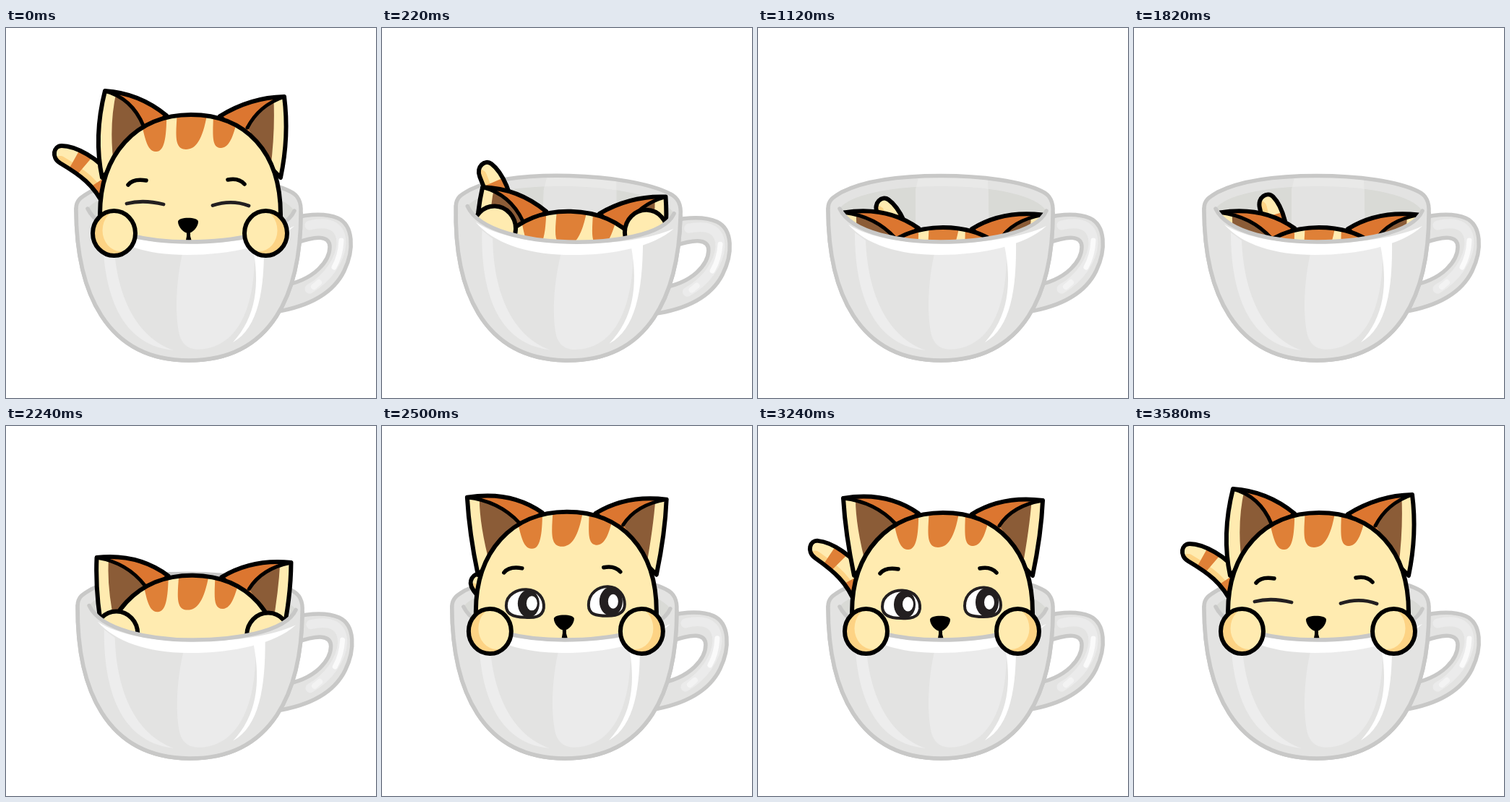
These frames come from a looping animation (512 by 512 pixels, 3.6 s). An HTML page with a canvas:

```html
<!DOCTYPE html>
<html lang="en">
<head>
<meta charset="utf-8">
<title>Cat in a cup</title>
<style>
html, body { margin: 0; width: 100%; height: 100%; overflow: hidden; background: #fff; }
canvas { display: block; width: 512px; height: 512px; }
</style>
</head>
<body>
<canvas id="stage" width="512" height="512"></canvas>
<script>
const ctx = document.getElementById('stage').getContext('2d');
const LOOP = 3600;
const CREAM = '#ffebb0', SHADE = '#fdd384', ORANGE = '#df8037', BROWN = '#8b5c37';
const LINE = '#c8c8c7', CUP = '#e3e3e2', INSIDE = '#d9dad6', PANEL = '#ebebeb';

const RIM = 'C130 285 200 296 253 296 C310 296 385 285 399 253';
const BACK = 'C97 238 104 234 116 227 C150 210 200 204.5 253 204.5 C310 204.5 365 212 393 226 C404 231 409 240 408 256';
const BODY = 'C408 364 370 460 253 460 C138 460 97 364 97 250';
const path = d => new Path2D(d);

const cup = {
  outer: path(`M97 250 ${BACK} ${BODY} Z`),
  body: path(`M408 256 ${BODY}`),
  front: path(`M113 250 ${RIM} L408 256 ${BODY} Z`),
  inside: path(`M113 250 ${RIM} C385 232 330 219 253 219 C180 219 125 232 113 250 Z`),
  rim: path(`M113 250 ${RIM}`),
  backLight: path('M222 206 L318 206 L320 296 L218 296 L218 225 Z'),
  above: path(`M0 0 H512 V253 H399 C385 285 310 296 253 296 C200 296 130 285 113 250 H0 Z`),
  gloss: path('M125 272 C155 291 205 298 253 298 C310 298 365 290 399 274 C370 301 310 314 250 314 C195 314 150 300 125 272 Z'),
  leftLight: path('M134 283 C134 350 150 438 232 446 C180 428 152 370 149 294 Z'),
  panel: path('M247 300 C235 345 233 395 240 425 C246 445 262 446 275 444 C325 436 346 380 344 300 Z'),
  streak: path('M341 301 C352 355 346 400 314 435 C350 415 358 360 357 295 Z'),
  handle: path('M395 263 C425 256 445 257 459 263 C481 273 482 307 468 336 C452 369 415 386 372 393 L380 357 C430 349 448 320 448 303 C448 287 430 287 400 298 Z')
};

const HEAD = path('M130 460 V258 C130 175 180 120 256 120 C332 120 380 172 380 258 V460 Z');
const STRIPES = path('M180 100 L187 130 C192 150 195 172 208 171 C221 171 223 145 222 100 Z ' +
  'M237 100 C238 135 228 168 249 168 C265 168 275 150 281 100 Z ' +
  'M287 100 C288 140 281 166 298 166 C311 165 315 145 321 125 V100 Z');
const NOSE = path('M238 268 C238 261 266 261 266 268 C266 275 258 284 252 284 C246 284 238 275 238 268 Z');
const MOUTH = path('M250 281 H255 V288 L258 299 H248 L250 288 Z');
const BROWS = path('M169 217 Q176 208 194 211 M307 210 Q322 207 330 216');
const SHUT_EYES = path('M167 243 Q190 237 218 244 M286 245.500 Q312 237 336 246');
const OPEN_EYES = path('M172 250 C172 233 189 227 200 227.500 C217 228 225 240 224 253 C222 266 210 267 198 266 C182 266 172 262 172 250 Z ' +
  'M286 249 C286 232 300 223 313 223.500 C328 224 336 236 336 248 C336 260 326 264 312 264 C296 264 286 262 286 249 Z');
const TAIL = path('M-3 -12 C15 -12 50 5 64 30 L74 58 L56 72 C42 42 22 28 -5 12 C-18 4 -14 -12 -3 -12 Z');
const TAIL_SPINE = path('M0 0 C30 10 50 35 62 68');
const TAIL_UNDERSIDE = path('M-5 12 C22 28 42 42 56 72');

function fill(shape, color) {
  ctx.fillStyle = color;
  ctx.fill(shape);
}

function stroke(shape, color, width) {
  ctx.strokeStyle = color;
  ctx.lineWidth = width;
  ctx.stroke(shape);
}

function ellipse(x, y, rx, ry) {
  const shape = new Path2D();
  shape.ellipse(x, y, rx, ry, 0, 0, 2 * Math.PI);
  return shape;
}

function scoped(draw) {
  ctx.save();
  draw();
  ctx.restore();
}

// Eased value at time t between [time, value] keys.
function track(t, ...keys) {
  const next = keys.findIndex(k => k[0] > t);
  if (next === 0) return keys[0][1];
  if (next < 0) return keys[keys.length - 1][1];
  const [t0, a] = keys[next - 1], [t1, b] = keys[next];
  const u = (t - t0) / (t1 - t0);
  return a + (b - a) * u * u * (3 - 2 * u);
}

function poseAt(t) {
  const wag = track(t, [220, 0], [420, 1], [2160, 1], [2400, 0]) *
    (0.5 - 0.5 * Math.cos(2 * Math.PI * (t - 1120) / 1400));
  const sway = t > 2840 && t < 3580 ? Math.sin(Math.PI * (t - 2840) / 740) ** 2 : 0;
  return {
    tilt: track(t, [20, 0], [220, .025], [270, .027], [400, -.01], [540, .007], [680, -.003], [820, 0],
      [2140, 0], [2240, .01], [2310, .027], [2430, -.009], [2550, .004], [2680, 0]),
    drop: track(t, [20, 0], [284, 156], [2128, 156], [2380, -8], [2540, 0]),
    spread: track(t, [0, 0], [220, .2], [420, .95], [2140, .95], [2240, .75], [2380, .95], [2540, 1], [3240, 1], [3420, 0]),
    open: track(t, [2280, 0], [2420, 1], [3240, 1], [3400, 0]),
    paw: track(t, [0, 0], [110, -36], [220, -4], [300, 60], [2140, 60], [2240, 4.5], [2320, -36], [2420, 0]),
    pawsBehind: t > 110 && t < 2320,
    tail: {
      x: track(t, [20, 80], [220, 140], [400, 176], [2260, 176], [2800, 80]) + 10 * wag + 5 * sway,
      y: track(t, [20, 175], [220, 202], [400, 249], [2260, 249], [2800, 175]) - 5 * wag - 4 * sway,
      turn: track(t, [20, 0], [220, .62], [2260, .62], [2800, 0]) + .17 * wag + .08 * sway
    }
  };
}

function drawTail({ x, y, turn }) {
  scoped(() => {
    ctx.translate(x, y);
    ctx.rotate(turn);
    fill(TAIL, CREAM);
    scoped(() => {
      ctx.clip(TAIL);
      stroke(TAIL_UNDERSIDE, SHADE, 20);
      ctx.lineCap = 'butt';
      ctx.setLineDash([0, 16, 17, 29, 20, 200]);
      stroke(TAIL_SPINE, ORANGE, 44);
    });
    stroke(TAIL, '#000', 6);
  });
}

function drawEar({ tip, top, side, inner, lining }) {
  const start = `M${tip} `;
  const [base, foot, fold] = [top, side, inner].map(q => q.slice(2));
  const outline = path(`${start}Q${top} L${foot} Q${side.slice(0, 2)} ${tip} Z`);
  const front = path(`${start}Q${inner} L${foot} Q${side.slice(0, 2)} ${tip} Z`);
  fill(outline, '#dc7630');
  fill(front, CREAM);
  scoped(() => {
    ctx.clip(front);
    fill(path(`M${lining} L${fold} L${base} Z`), BROWN);
  });
  stroke(path(`${start}Q${inner}`), '#000', 5);
  stroke(outline, '#000', 6);
}

function drawEars(e) {
  const lx = 137 - 19 * e, ly = 87 + 13 * e;
  drawEar({
    tip: [lx, ly],
    top: [184 - 6 * e, 90, 222, 121],
    side: [121, 150, 133, 207],
    inner: [174 - 12 * e, 97 + 8 * e, 190, 135],
    lining: `${lx + 17} ${ly - 4} Q${141 - 7 * e} 135 150 195`
  });
  const rx = 385 + 9 * e, ry = 95 + 8 * e;
  drawEar({
    tip: [rx, ry],
    top: [338, 96, 296, 122],
    side: [392, 150, 380, 207],
    inner: [350 + 2 * e, 107 + 3 * e, 334, 138],
    lining: `${rx - 15} ${ry - 4} Q${373 + 3 * e} 140 366 195`
  });
}

function drawEyes(open) {
  if (open < .2) return stroke(SHUT_EYES, '#231f20', 4.8);
  scoped(() => {
    ctx.translate(0, 247 * (1 - open));
    ctx.scale(1, open);
    fill(OPEN_EYES, '#fff');
    fill(ellipse(203, 247, 15, 19), '#231f20');
    fill(ellipse(317, 244, 16, 20), '#231f20');
    fill(ellipse(207.500, 246.500, 7.500, 10), '#fff');
    fill(ellipse(320, 244, 7, 10), '#fff');
    stroke(OPEN_EYES, '#231f20', 4);
  });
}

function drawHead(open) {
  fill(HEAD, CREAM);
  scoped(() => {
    ctx.clip(HEAD);
    fill(STRIPES, ORANGE);
  });
  stroke(HEAD, '#000', 6);
  scoped(() => {
    ctx.translate(0, -13 * open);
    stroke(BROWS, '#000', 5.5);
  });
  drawEyes(open);
  fill(NOSE, '#000');
  fill(MOUTH, '#000');
}

function drawPaws({ paw, pawsBehind }) {
  const inward = pawsBehind ? 1.5 : 0;
  for (const [x, dir] of [[149.5 + inward, 1], [359.5 + inward, -1]]) {
    const shape = ellipse(x, 284 + paw, 29.5, 31);
    fill(shape, pawsBehind ? CREAM : SHADE);
    scoped(() => {
      ctx.clip(shape);
      fill(ellipse(x + 9 * dir, 280 + paw, 25, 29), CREAM);
    });
    stroke(shape, '#000', 6);
  }
}

function drawCupBack() {
  fill(cup.handle, CUP);
  stroke(path('M420 273 C450 266 464 276 464 298 C463 320 446 346 420 361'), PANEL, 13);
  stroke(path('M464 294 Q463 315 454 331'), '#fafafa', 7);
  stroke(path('M426 358 L433 352'), '#f3f3f3', 8);
  stroke(cup.handle, LINE, 5.5);
  fill(cup.outer, CUP);
  fill(cup.inside, INSIDE);
  scoped(() => {
    ctx.clip(cup.outer);
    fill(cup.backLight, '#e9e9e8');
    ctx.clip(cup.inside);
    fill(cup.backLight, '#e3e3e2');
  });
  stroke(cup.outer, LINE, 5.5);
}

function drawCupFront() {
  fill(cup.front, CUP);
  fill(cup.leftLight, '#ededed');
  fill(cup.panel, PANEL);
  fill(cup.streak, '#fff');
  fill(cup.gloss, '#fff');
  stroke(cup.body, LINE, 5.5);
  stroke(cup.rim, LINE, 5.5);
}

function draw(t) {
  const pose = poseAt(t);
  ctx.fillStyle = '#fff';
  ctx.fillRect(0, 0, 512, 512);
  ctx.lineCap = ctx.lineJoin = 'round';
  scoped(() => {
    ctx.translate(253, 460);
    ctx.rotate(pose.tilt);
    ctx.translate(-253, -460);
    drawCupBack();
    scoped(() => {
      ctx.clip(cup.above);
      drawTail(pose.tail);
      scoped(() => {
        ctx.translate(0, pose.drop);
        drawEars(pose.spread);
        drawHead(pose.open);
      });
      if (pose.pawsBehind) drawPaws(pose);
    });
    drawCupFront();
    if (!pose.pawsBehind) drawPaws(pose);
  });
}

function tick() {
  draw(performance.now() % LOOP);
  requestAnimationFrame(tick);
}
tick();
</script>
</body>
</html>
```
